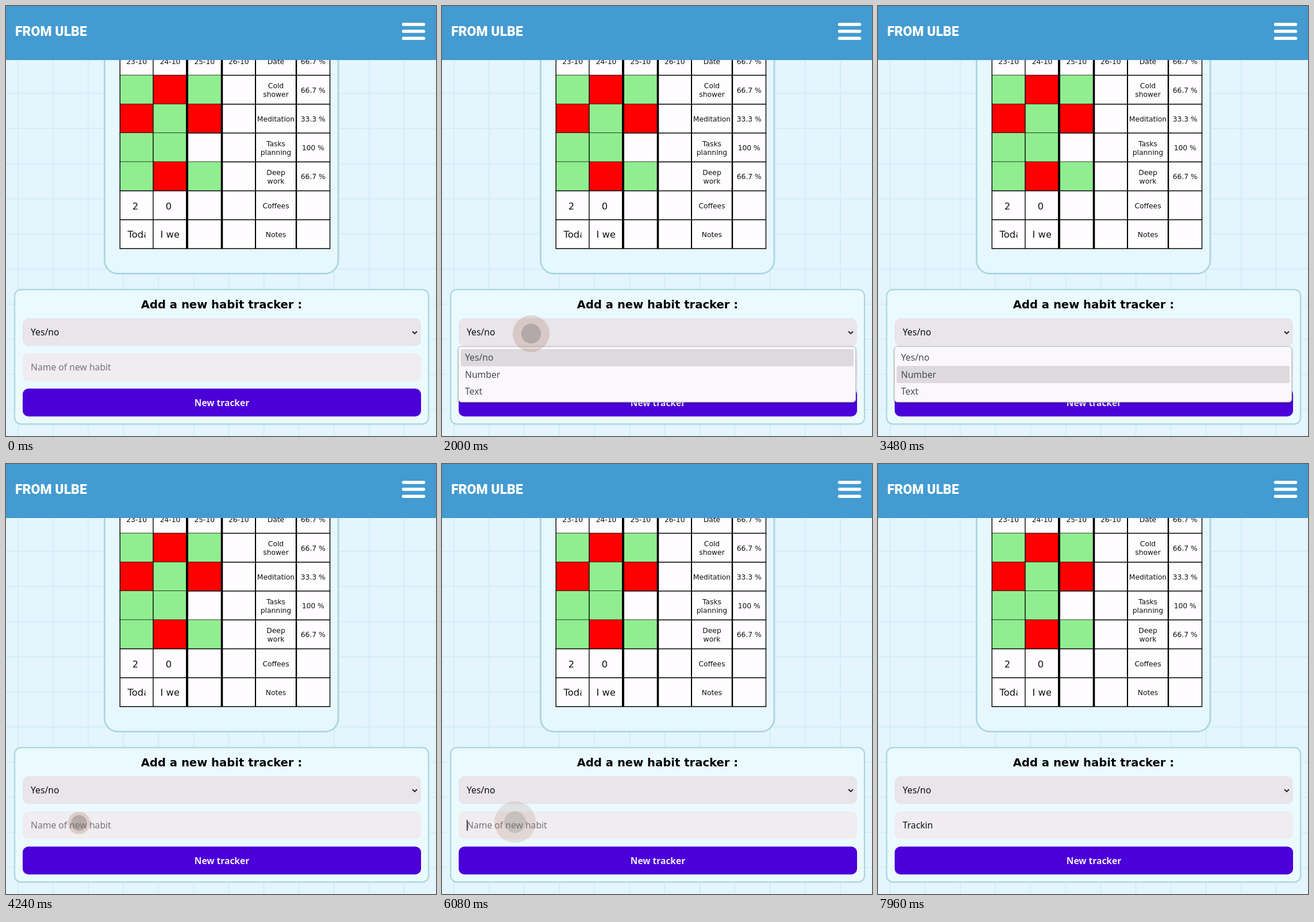
Recreate the animation shown at these times as an HTML page. Size 748 by 748 pixels, loop 8 s.

```html
<!DOCTYPE html>
<html lang="en">
<head>
<meta charset="utf-8">
<title>Habit tracker</title>
<style>
  html, body { margin: 0; width: 100%; height: 100%; overflow: hidden; }
  svg { display: block; width: 100%; height: 100%; }
  .table { font: 12.3px "DejaVu Sans", sans-serif; text-anchor: middle; fill: #111; }
  .entry { font: 16.4px "DejaVu Sans", sans-serif; fill: #111; }
  .form { font: 15.7px "Noto Sans", sans-serif; fill: #111; }
  .title { font: bold 19.6px "DejaVu Sans", sans-serif; text-anchor: middle; }
  .brand { font: 900 23px Roboto, sans-serif; fill: #fff; }
  .button { font-size: 15.5px; font-weight: 600; text-anchor: middle; fill: #f0ebfc; }
</style>
</head>
<body>
<svg viewBox="0 0 748 748">
  <defs>
    <pattern id="grid" x="20" y="29" width="61.1" height="61.1" patternUnits="userSpaceOnUse">
      <path d="M.8 0V61.1M0 .8H61.1" stroke="#cfecf4" stroke-width="1.6"/>
    </pattern>
    <clipPath id="note0"><rect x="205" y="380" width="38" height="34"/></clipPath>
    <clipPath id="note1"><rect x="263" y="380" width="38" height="34"/></clipPath>
    <filter id="shadow" x="-5%" y="-10%" width="110%" height="125%">
      <feDropShadow dx="0" dy="1" stdDeviation="1.5" flood-opacity=".4"/>
    </filter>
  </defs>

  <rect width="748" height="748" fill="#e4f5fe"/>
  <rect width="748" height="748" fill="url(#grid)"/>

  <rect x="171.5" y="0" width="406.5" height="465.5" rx="23" fill="#e6f7fe" stroke="#add8e1" stroke-width="3"/>
  <g id="table"></g>
  <g class="entry">
    <text x="225" y="354" text-anchor="middle">2</text>
    <text x="283" y="354" text-anchor="middle">0</text>
    <text x="211.5" y="403.3" clip-path="url(#note0)">Today</text>
    <text x="268.5" y="403.3" clip-path="url(#note1)">I went</text>
  </g>

  <rect width="748" height="94" fill="#439bd1"/>
  <text class="brand" x="16" y="52">FROM ULBE</text>
  <path d="M691.5 32H726.5M691.5 44H726.5M691.5 56.3H726.5" stroke="#fff" stroke-width="5.6" stroke-linecap="round"/>

  <rect x="15" y="493.3" width="720" height="234" rx="11" fill="#ebfaff" stroke="#add8e1" stroke-width="2.4"/>
  <text class="title" x="375" y="525.7">Add a new habit tracker :</text>
  <g class="form">
    <rect x="29" y="543" width="693" height="48.5" rx="10" fill="#e8e5eb"/>
    <text x="43" y="573.3">Yes/no</text>
    <path d="M707 566l4 4 4-4" fill="none" stroke="#222" stroke-width="1.9"/>
    <rect x="29" y="604" width="693" height="48.5" rx="10" fill="#efedf0"/>
    <text id="habit" x="43" y="634.3"></text>
    <path id="caret" d="M43.7 619V638" stroke="#222" stroke-width="1.5"/>
    <rect x="29" y="665.5" width="693" height="48.5" rx="10" fill="#4b00d9"/>
    <text class="button" x="375.5" y="695.7">New tracker</text>
    <g id="menu">
      <rect x="28.7" y="592.5" width="691" height="96.5" rx="5" fill="#faf8fc" stroke="#bdbabd" filter="url(#shadow)"/>
      <rect id="hover" x="32.5" width="683.5" height="30" rx="3" fill="#dcdadc"/>
      <g fill="#4a4a4c">
        <text x="40" y="617.3">Yes/no</text>
        <text x="40" y="646.8">Number</text>
        <text x="40" y="676.3">Text</text>
      </g>
    </g>
  </g>
  <g id="ripple">
    <circle id="outer" fill="rgb(165,105,80)" fill-opacity=".24"/>
    <circle id="inner" fill="rgb(110,115,115)" fill-opacity=".36"/>
  </g>
</svg>
<script>
const LOOP = 8000;
const RIPPLE_MS = 600;
const byId = id => document.getElementById(id);

function buildTable() {
  const xs = [198.3, 256, 315, 375.5, 434, 505, 563.5];
  const weights = [1.4, 1.4, 4, 3.6, 2, 2.4, 1.4];
  const top = 120.5, rowHeight = 50.25;
  const rows = [
    ["Date", "66.7 %", ""], ["Cold shower", "66.7 %", "grg"], ["Meditation", "33.3 %", "rgr"],
    ["Tasks planning", "100 %", "gg"], ["Deep work", "66.7 %", "grg"], ["Coffees", "", ""], ["Notes", "", ""]
  ];
  const colors = { g: "#90ee90", r: "#f00" };
  const center = col => (xs[col] + xs[col + 1]) / 2;
  const label = (x, y, s) => `<text x="${x}" y="${y + 4.5}">${s}</text>`;
  let out = `<rect x="198.3" y="70" width="365.2" height="352" fill="#fffdff"/>`;
  let text = ["23-10", "24-10", "25-10", "26-10"].map((d, i) => label(center(i), 96, d)).join("");

  rows.forEach(([name, rate, marks], i) => {
    const y = top + (i - 1) * rowHeight;
    const mid = i ? y + rowHeight / 2 + .6 : 96;
    [...marks].forEach((m, c) => {
      out += `<rect x="${xs[c]}" y="${y}" width="${xs[c + 1] - xs[c]}" height="${rowHeight}" fill="${colors[m]}"/>`;
    });
    const words = name.split(" ");
    words.forEach((w, k) => text += label(center(4), mid + (k - (words.length - 1) / 2) * 15.4, w));
    text += label(center(5), mid, rate);
    out += `<path d="M197.6 ${y + rowHeight}H564.2" stroke="#000" stroke-width="1.4"/>`;
  });
  xs.forEach((x, i) => out += `<path d="M${x} 70V422" stroke="#000" stroke-width="${weights[i]}"/>`);
  byId("table").innerHTML = out + `<g class="table">${text}</g>`;
}

const clicks = [[1670, 155, 570], [4072, 127, 624.5], [5670, 127, 623]];
const hovers = [[1760, 0], [2640, 1], [2800, 2], [3480, 1], [3680, 0]];
const MENU_CLOSE = 4140, FOCUS = 5760, TYPE_START = 7400, KEY_MS = 86;

function drawRipple(t) {
  const click = clicks.find(([start]) => t >= start && t < start + RIPPLE_MS);
  byId("ripple").style.display = click ? "" : "none";
  if (!click) return;
  const [start, x, y] = click;
  const p = (t - start) / RIPPLE_MS;
  const grow = 1 - (1 - p) ** 2;
  const place = (id, r) => {
    for (const [key, value] of Object.entries({ cx: x, cy: y, r })) byId(id).setAttribute(key, value);
  };
  place("outer", 40 * grow);
  place("inner", 10 + 13 * p);
  byId("ripple").style.opacity = Math.min(1, (1 - p) * 2.2);
}

function draw(t) {
  const hover = hovers.filter(([start]) => t >= start).pop();
  const open = hover && t < MENU_CLOSE;
  byId("menu").style.display = open ? "" : "none";
  if (open) byId("hover").setAttribute("y", 596.7 + hover[1] * 29.4);

  const typed = "Trackin".slice(0, Math.max(0, Math.floor((t - TYPE_START) / KEY_MS) + 1));
  byId("habit").textContent = typed || "Name of new habit";
  byId("habit").style.fill = typed ? "#111" : "#777579";
  const caretOn = t >= FOCUS && !typed && (t - FOCUS) % 1200 < 600;
  byId("caret").style.display = caretOn ? "" : "none";
  drawRipple(t);
}

function tick() {
  draw(performance.now() % LOOP);
  requestAnimationFrame(tick);
}

buildTable();
tick();
</script>
</body>
</html>
```
